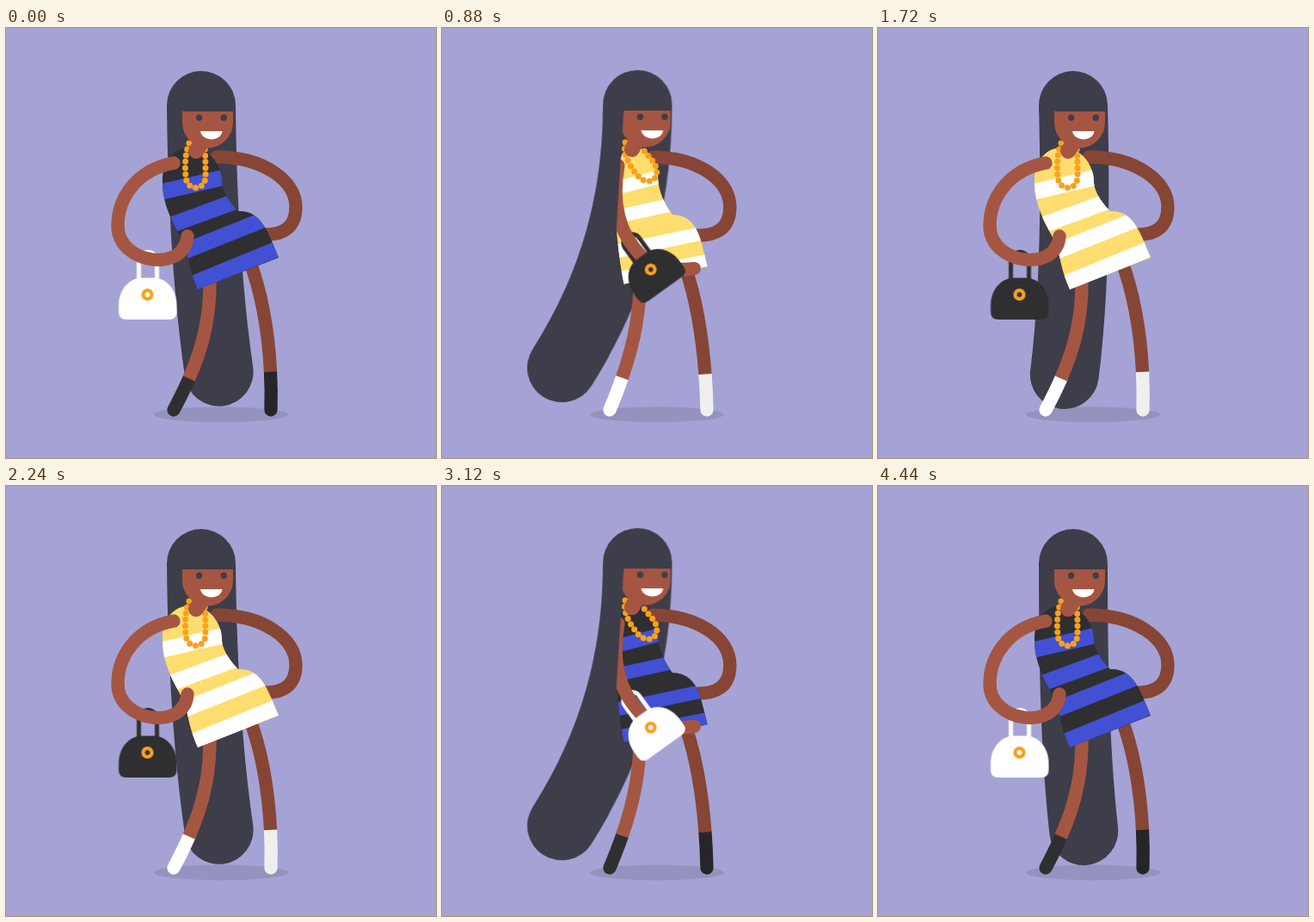
An HTML page without scripts for the animation above (4.48 s loop, 500 by 500 pixels).

```html
<!DOCTYPE html>
<html lang="en">
<head>
<meta charset="utf-8">
<title>Twirl</title>
<style>
html, body { margin: 0; width: 100%; height: 100%; overflow: hidden; background: #a5a3d5; }
svg {
  display: block; width: 100vw; height: 100vh; fill: none;
  --skin: #a55642; --shade: #874535; --hair: #3e3d4a; --gold: #f9a11b;
  animation: outfit 4480ms step-end infinite;
}
svg * { animation-duration: 2240ms; animation-iteration-count: infinite; animation-timing-function: linear; }

/* Limbs pass through every quarter of the turn, the dress only through the back view. */
.limb { animation-name: limb; stroke-width: 15.3; stroke-linecap: round; }
.body { animation-name: body; }
.bag { animation-name: bag; }
.head { animation-name: head; }
.hair { animation-name: hair; stroke: var(--hair); stroke-width: 80; stroke-linecap: round; }
.cover { animation-name: cover; }
.face { animation-name: face; }
.gaze { animation-name: gaze; }
.near { animation-name: near; }
.far { animation-name: far; visibility: hidden; }

.light { stroke: var(--skin); }
.dark { stroke: var(--shade); }
.bare { stroke-linecap: butt; stroke-dasharray: 75 100; }
.boot { stroke-dasharray: 26 100; stroke-dashoffset: -75; }
.stripes { animation-name: body, trim; stroke: var(--stripe); stroke-linecap: square; }
.beads { stroke: var(--gold); stroke-width: 7; stroke-linecap: round; stroke-dasharray: 0 7.3; }
.neck { stroke: var(--skin); stroke-width: 18; stroke-linecap: round; }

@keyframes outfit {
  0%, 60.71%, 100% { --base: #2f2f31; --stripe: #4250d4; --boot: #2f2f31; --boot2: #262529; --bag: #fff; }
  10.71% { --base: #ffdd6e; --stripe: #fff; --boot: #fff; --boot2: #efeff0; --bag: #2f2f31; }
}
@keyframes limb {
  0% { d: var(--a); animation-timing-function: ease-in; }
  12.5% { d: var(--q1); }
  21.43% { d: var(--h); }
  30.36% { d: var(--q3); }
  39.29% { d: var(--c); animation-timing-function: ease-out; }
  51.8%, 61.2% { d: var(--b); animation-timing-function: ease-in-out; }
  74%, 100% { d: var(--a); }
}
@keyframes body {
  0% { d: var(--a); animation-timing-function: ease-in; }
  21.43% { d: var(--h); }
  39.29% { d: var(--c); animation-timing-function: ease-out; }
  51.8%, 61.2% { d: var(--b); animation-timing-function: ease-in-out; }
  74%, 100% { d: var(--a); }
}
@keyframes trim {
  0%, 51.8%, 100% { stroke-width: 18.5px; }
  39.29% { stroke-width: 15.5px; }
}
@keyframes bag {
  0% { transform: translate(164.5px, 310px) rotate(0deg) scale(1); animation-timing-function: ease-in; }
  12.5% { transform: translate(190px, 296px) rotate(10deg) scale(1); }
  21.43% { transform: translate(310px, 300px) rotate(-8deg) scale(1); }
  30.36% { transform: translate(315px, 292px) rotate(-20deg) scale(1); }
  39.29% { transform: translate(243.5px, 281px) rotate(-36deg) scale(.97); animation-timing-function: ease-out; }
  51.8%, 61.2% { transform: translate(102px, 248px) rotate(6deg) scale(1); animation-timing-function: ease-in-out; }
  74%, 100% { transform: translate(164.5px, 310px) rotate(0deg) scale(1); }
}
@keyframes head {
  0% { transform: translate(0, 0); animation-timing-function: ease-in-out; }
  24% { transform: translate(0, -14px); animation-timing-function: ease-in-out; }
  39.29% { transform: translate(.4px, -1px); animation-timing-function: ease-out; }
  51.8%, 61.2% { transform: translate(10px, 0); animation-timing-function: ease-in; }
  67.5% { transform: translate(5px, -8px); animation-timing-function: ease-out; }
  74%, 100% { transform: translate(0, 0); }
}
@keyframes hair {
  0%, 100% { d: path("M227 90C228 190 233 300 247 400"); }
  0% { animation-timing-function: cubic-bezier(.4, .2, .6, 1); }
  14.3% { d: path("M227 90C232 195 300 325 435 340"); animation-timing-function: ease-in; }
  25% { d: path("M227 90C215 180 200 300 245 434"); animation-timing-function: ease-out; }
  34% { d: path("M227 90C215 190 160 300 80 374"); animation-timing-function: ease-in; }
  39.29% { d: path("M227 90C227 200 200 300 138 396"); animation-timing-function: ease-out; }
  51.8% { d: path("M227 90C216 190 240 300 304 392"); animation-timing-function: ease-in; }
  60.71% { d: path("M227 90C221 190 227 310 252 402"); animation-timing-function: ease-out; }
  74% { d: path("M227 90C230 190 230 300 216 403"); animation-timing-function: ease-in-out; }
  90% { d: path("M227 90C226 190 226 300 229 402"); animation-timing-function: ease-in; }
  98.21% { d: path("M227 90C227 190 228 300 239 401"); }
}
/* Window through which the hair shows in front of the body. */
@keyframes cover {
  0% { transform: translateX(400px); }
  6.3% { transform: translateX(375px); }
  17.8% { transform: translateX(280px); }
  22%, 25% { transform: translateX(0); }
  28.5% { transform: translateX(-330px); }
  39.29% { transform: translateX(-389px); }
  48% { transform: translateX(-425px); }
  52%, 99.9% { transform: translateX(-490px); }
  100% { transform: translateX(400px); }
}
@keyframes face {
  0% { transform: translateX(0); animation-timing-function: ease-in; }
  12.5% { transform: translateX(-46px); }
  17% { transform: translateX(-78px); }
  17.01%, 27% { transform: translateX(68px); }
  34% { transform: translateX(22px); }
  39.29% { transform: translateX(1.5px); animation-timing-function: ease-out; }
  45%, 100% { transform: translateX(0); }
}
@keyframes gaze {
  0%, 22%, 45%, 100% { transform: translateX(0); }
  39.29% { transform: translateX(3.7px); }
}
@keyframes near {
  0%, 7.1%, 21.44%, 100% { visibility: visible; }
  7.11%, 21.43% { visibility: hidden; }
}
@keyframes far {
  0%, 7.1%, 21.44%, 100% { visibility: hidden; }
  7.11%, 21.43% { visibility: visible; }
}
</style>
</head>
<body>
<svg viewBox="0 0 500 500">
  <defs>
    <clipPath id="dress">
      <path class="body" style="
        --a:path('M223 304C214 284 212 270 209 256C205 242 182 215 182 180C181 152 198 138 216 139C236 139 252 160 251 180C252 192 262 205 270 213C296 211 305 237 317 267Z');
        --h:path('M184 290C186 275 196 255 204 236C198 215 190 200 190 178C192 148 208 130 227 130C246 130 262 148 264 178C264 200 256 215 250 236C258 255 268 275 270 290Z');
        --c:path('M212 298C208 280 206 262 204 244C202 230 205 205 205 180C204 155 208 138 224 139C240 139 250 155 251 172C251 190 260 206 268 217C298 218 301 245 309 277Z');
        --b:path('M134 274C138 250 148 228 168 211C180 196 177 185 178 168C179 150 193 138 212 138C234 139 249 155 248 178C248 202 238 222 230 238C242 255 237 270 228 301Z')"/>
    </clipPath>
    <clipPath id="skull"><rect x="190" y="60" width="75.5" height="80" rx="25"/></clipPath>
    <clipPath id="window"><path class="cover" d="M-100 0H606L575 500H-100Z"/></clipPath>
  </defs>

  <ellipse cx="250" cy="449.500" rx="78" ry="9" fill="#9492be"/>
  <g class="head"><path class="hair"/></g>
  <use href="#arm" class="far"/>

  <path class="limb dark" style="
    --a:path('M245 150C300 150 337 178 337 208C337 232 322 241 300 240');
    --q1:path('M235 152C262 180 265 215 250 235C235 250 215 250 200 245');
    --h:path('M196 155C150 160 112 180 112 215C112 245 150 255 195 245');
    --q3:path('M225 150C262 165 280 195 285 220C285 240 260 245 240 243');
    --c:path('M245 150C295 150 335 175 335 208C335 234 318 241 298 241');
    --b:path('M240 158C280 168 305 205 305 235C305 265 280 280 236 269')"/>

  <g style="
    --a:path('M283 270C300 315 310 380 308 444');
    --q1:path('M240 285C236 340 252 390 251 454');
    --h:path('M205 285C208 335 205 390 195 444');
    --q3:path('M248 285C252 340 252 385 251 434');
    --c:path('M284 280C300 328 307 388 308 444');
    --b:path('M207 290C225 340 260 395 308 444')">
    <path class="limb boot" pathLength="100" stroke="var(--boot2)"/>
    <path class="limb dark bare" pathLength="100"/>
  </g>
  <g style="
    --a:path('M237 290C238 345 225 388 195 444');
    --q1:path('M240 285C242 340 250 385 251 434');
    --h:path('M265 285C275 335 298 390 308 444');
    --q3:path('M235 285C236 340 250 390 251 454');
    --c:path('M231 290C230 340 222 380 195 444');
    --b:path('M153 270C152 340 160 395 195 444')">
    <path class="limb boot" pathLength="100" stroke="var(--boot)"/>
    <path class="limb light bare" pathLength="100"/>
  </g>

  <g clip-path="url(#dress)">
    <rect width="500" height="500" fill="var(--base)"/>
    <path class="body stripes" style="
      --a:path('M220 296L313 258M209 259L297 224M195 228L263 203M183 190L252 174');
      --h:path('M180 282L274 282M196 246L258 246M190 212L264 212M188 176L266 176');
      --c:path('M209 291L308 271M203 260L301 239M206 219L264 206M211 184L253 173');
      --b:path('M136 266L231 292M150 231L235 253M172 199L240 216M179 171L249 179')"/>
  </g>
  <path class="body beads" style="
    --a:path('M213 134C208 146 208 160 209 174C211 190 232 190 232 172C232 160 232 150 231 138');
    --h:path('M215 134C208 146 210 160 212 170C214 184 240 184 242 170C244 160 246 146 239 134');
    --c:path('M213 133C210 146 218 160 227 171C236 182 250 180 250 166C249 156 240 150 233 140');
    --b:path('M220 134C210 137 209 158 208 174C210 190 230 190 231 176C232 166 233 156 234 142')"/>
  <path class="body neck" style="
    --a:path('M221 143L231 128');
    --h:path('M227 136L227 112');
    --c:path('M221 141L229 126');
    --b:path('M223 145L236 128')"/>

  <g class="near">
    <g id="arm">
      <g class="bag"><path d="M-10-15V-39A10.500 10.500 0 0 1 11-39V-15" stroke="var(--bag)" stroke-width="5"/></g>
      <path class="limb light" style="
        --a:path('M195 157C150 165 130 200 130 230C130 275 208 285 211 242');
        --q1:path('M215 157C175 180 150 205 160 232C170 262 205 270 225 250');
        --h:path('M260 158C300 165 322 195 322 225C322 262 285 275 262 245');
        --q3:path('M235 158C240 190 265 230 285 250C300 262 320 260 330 255');
        --c:path('M205 160C197 205 207 240 232 265C245 280 270 283 294 280');
        --b:path('M195 148C173 110 90 118 90 175C90 220 145 228 163 210')"/>
      <g class="bag">
        <path d="M-33.500 13C-33.500-8-19-19.500-7-19.500H8C20-19.500 34-8 34 13V20Q34 29 25 29H-24.500Q-33.500 29-33.500 20Z" fill="var(--bag)"/>
        <circle r="5" stroke="var(--gold)" stroke-width="4.200"/>
      </g>
    </g>
  </g>

  <g class="head">
    <g clip-path="url(#skull)">
      <g class="face">
        <path d="M205 97H264V110A29.500 29.500 0 0 1 205 110Z" fill="var(--skin)"/>
        <g class="gaze">
          <circle cx="224.700" cy="104.300" r="3.700" fill="var(--hair)"/>
          <circle cx="253.200" cy="104.300" r="3.700" fill="var(--hair)"/>
          <path d="M226 120H251.500C250 132.500 228 132.500 226 120Z" fill="#fff"/>
        </g>
      </g>
    </g>
    <g clip-path="url(#window)"><path class="hair"/></g>
  </g>
</svg>
</body>
</html>
```
